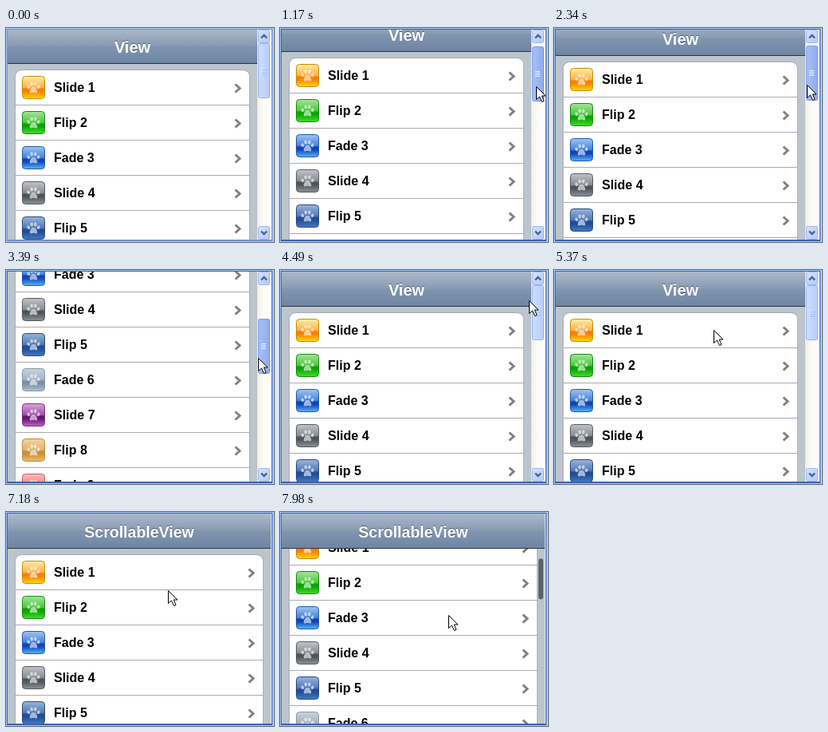
Animation, 336 px wide and 268 px high, one loop 8 s. Source, as an HTML page with a canvas:

```html
<!DOCTYPE html>
<html lang="en">
<head>
<meta charset="utf-8">
<title>Scrollable view</title>
<style>
html, body { margin: 0; width: 100%; height: 100%; overflow: hidden; background: #fff; }
canvas { display: block; }
</style>
</head>
<body>
<canvas id="stage" width="336" height="268"></canvas>
<script>
const ctx = document.getElementById('stage').getContext('2d');
const LOOP = 8000;
const STEP = 60;
const FONT = '"Liberation Sans", Arial, sans-serif';
const VIEW = { x: 2, y: 2, r: 332, b: 265 };
const NARROW = 313, WIDE = 330;
const ROW = 44, LIST_TOP = 54, BAR = 46;
const KINDS = ['Slide', 'Flip', 'Fade'];

// Icon colours: top, upper middle, lower middle, bottom, edge
const TINTS = [
  ['#fff0a4', '#fbb04c', '#ff7e00', '#ffde10', '#c58a08'],
  ['#a8e69c', '#4cc83c', '#0ca404', '#44e42c', '#128a10'],
  ['#a4c8f2', '#4480d8', '#1044b8', '#5cbcfa', '#2058ac'],
  ['#c2c5c9', '#888c92', '#4e545a', '#8f969c', '#565b60'],
  ['#9cb6dc', '#5278b4', '#204c98', '#477cc4', '#284a84'],
  ['#ccd4dd', '#a3b2c3', '#7b90a7', '#b2c2d2', '#8496a8'],
  ['#dda6dd', '#a04fa6', '#6a1376', '#c466cc', '#7c3384'],
  ['#f2d6a6', '#e0b26a', '#cb8f34', '#efc175', '#bf8b40'],
  ['#fcbcbc', '#f48585', '#e84848', '#ff9292', '#d05858']
];

// Each movement advances in equal steps from its start
const STARTS = [0, 660, 1040, 1900, 2910, 3990, 4890, 5900, 7060, 7680];

// Keyframes: [time, value, ...]
const SCROLL = [[1000, 1], [1580, 86], [1700, 86], [2320, 11], [2600, 0],
  [2870, 0], [3390, 158], [3960, 158], [4280, 0]];
const CURSOR = [[660, 333, 62], [780, 321, 69], [1000, 321, 69], [1580, 320, 91],
  [1700, 320, 91], [2320, 317, 71], [2600, 317, 69], [2870, 317, 69],
  [3390, 316, 110], [3960, 316, 110], [4240, 316, 69], [4290, 312, 38],
  [4850, 312, 38], [5370, 200, 75], [7020, 200, 75], [7480, 211, 159],
  [7640, 211, 159], [7980, 211, 129]];
const DRAG = [[7640, 0], [7980, 31]];
const SLIDE = [[5885, 0], [6260, 1]];

const ease = p => (1 - Math.cos(Math.PI * p)) / 2;

function stepped(t) {
  const from = STARTS.filter(s => s <= t).pop();
  return from + Math.floor((t - from) / STEP) * STEP;
}

function at(keys, t, col = 1) {
  if (t <= keys[0][0]) return keys[0][col];
  for (let i = 1; i < keys.length; i++) {
    const a = keys[i - 1], b = keys[i];
    if (t < b[0]) return a[col] + (b[col] - a[col]) * ease((t - a[0]) / (b[0] - a[0]));
  }
  return keys[keys.length - 1][col];
}

function rect(x, y, w, h, fill) {
  ctx.fillStyle = fill;
  ctx.fillRect(x, y, w, h);
}

function rounded(x, y, w, h, r) {
  ctx.beginPath();
  ctx.roundRect(x, y, w, h, r);
}

function outlined(fill, edge) {
  ctx.fillStyle = fill;
  ctx.fill();
  ctx.strokeStyle = edge;
  ctx.lineWidth = 1;
  ctx.stroke();
}

function clipped(x, y, w, h, draw) {
  ctx.save();
  ctx.beginPath();
  ctx.rect(x, y, w, h);
  ctx.clip();
  draw();
  ctx.restore();
}

function ramp(x0, y0, x1, y1, stops) {
  const g = ctx.createLinearGradient(x0, y0, x1, y1);
  stops.forEach(([p, c]) => g.addColorStop(p, c));
  return g;
}

function line(points, color, width) {
  ctx.beginPath();
  points.forEach(([x, y]) => ctx.lineTo(x, y));
  ctx.strokeStyle = color;
  ctx.lineWidth = width;
  ctx.stroke();
}

function dot(x, y, rx, ry, turn = 0) {
  ctx.beginPath();
  ctx.ellipse(x, y, rx, ry, turn, 0, Math.PI * 2);
  ctx.fill();
}

function icon(x, y, [top, upper, lower, bottom, edge]) {
  rounded(x + .5, y + .5, 28, 28, 4);
  outlined(ramp(0, y, 0, y + 29,
    [[0, top], [.5, upper], [.55, lower], [.66, lower], [1, bottom]]), edge);
  ctx.fillStyle = 'rgba(255,255,255,.6)';
  dot(x + 8.3, y + 13.8, 1.8, 2.4, -.4);
  dot(x + 12.2, y + 10, 1.8, 2.6, -.1);
  dot(x + 16.8, y + 10, 1.8, 2.6, .1);
  dot(x + 20.7, y + 13.8, 1.8, 2.4, .4);
  ctx.beginPath();
  ctx.moveTo(x + 14.5, y + 14);
  ctx.bezierCurveTo(x + 18, y + 14, x + 19, y + 18, x + 19.3, y + 19.5);
  ctx.bezierCurveTo(x + 19, y + 23, x + 16, y + 20.8, x + 14.5, y + 20.8);
  ctx.bezierCurveTo(x + 13, y + 20.8, x + 10, y + 23, x + 9.7, y + 19.5);
  ctx.bezierCurveTo(x + 10, y + 18, x + 11, y + 14, x + 14.5, y + 14);
  ctx.fill();
}

function list(x, y, width, selected) {
  const left = x + 9.5, w = width - 19, right = left + w;
  ctx.save();
  rounded(left, y, w, ROW * 22, 8);
  ctx.fillStyle = '#fff';
  ctx.fill();
  ctx.clip();
  TINTS.forEach((tint, i) => {
    const top = y + i * ROW, on = i === selected;
    if (on) rect(left, top, w, ROW, ramp(0, top, 0, top + ROW, [[0, '#058cf5'], [1, '#015de6']]));
    rect(left, top + ROW - 1, w, 1, '#a9abad');
    icon(x + 18, top + 7, tint);
    ctx.font = `bold 16px ${FONT}`;
    ctx.textAlign = 'left';
    ctx.fillStyle = on ? '#fff' : '#000';
    ctx.fillText(`${KINDS[i % 3]} ${i + 1}`, x + 58, top + 27);
    const cx = right - 18, cy = top + 22.5;
    line([[cx, cy - 5], [cx + 5.5, cy], [cx, cy + 5]], on ? '#fff' : '#808080', 3);
  });
  ctx.restore();
  rounded(left, y - .5, w, ROW * 22, 8);
  ctx.strokeStyle = '#a6abb0';
  ctx.lineWidth = 1;
  ctx.stroke();
}

function header(x, y, width, title) {
  rect(x, y, width, BAR, ramp(0, y, 0, y + BAR,
    [[0, '#b0bccd'], [.5, '#889bb3'], [.52, '#8195af'], [1, '#6d84a2']]));
  rect(x, y + BAR - 1, width, 1, '#2d3642');
  ctx.font = `bold ${title.length > 6 ? 19.5 : 20}px ${FONT}`;
  ctx.textAlign = 'center';
  const cx = x + width / 2;
  ctx.fillStyle = 'rgba(0,0,0,.4)';
  ctx.fillText(title, cx, y + 31);
  ctx.fillStyle = '#fff';
  ctx.fillText(title, cx, y + 32);
}

function page(x, width, title, { scroll = 0, drag = 0, selected = -1 } = {}) {
  rect(x, VIEW.y, width, VIEW.b - VIEW.y, '#bcc5ce');
  list(x, LIST_TOP - scroll - drag, width, selected);
  header(x, -scroll, width, title);
}

function barButton(y, dir) {
  rounded(316.5, y + .5, 14, 16, 2);
  outlined(ramp(316, y, 331, y + 16, [[0, '#d8e4ff'], [1, '#b2c8fa']]), '#9db5ea');
  const cy = y + 8.5;
  line([[320, cy + 2 * dir], [323.5, cy - 1.5 * dir], [327, cy + 2 * dir]], '#4d6185', 2.4);
}

function scrollbar(offset, state) {
  rect(315, VIEW.y, 17, VIEW.b - VIEW.y,
    ramp(315, 0, 332, 0, [[0, '#f0efe8'], [.4, '#fbfaf6'], [1, '#fefefb']]));
  barButton(2, 1);
  barButton(248, -1);
  const y = Math.round(19 + offset);
  const [from, to, edge] = [
    ['#d0defd', '#b7ccfb', '#98b2ea'],
    ['#dee9ff', '#c6dbff', '#98b2ea'],
    ['#a9c1f7', '#8eaaf0', '#7c98e0']
  ][state];
  rounded(316.5, y + .5, 14, 68, 2);
  outlined(ramp(316, 0, 331, 0, [[0, from], [1, to]]), edge);
  for (let i = 0; i < 4; i++) {
    rect(320, y + 31 + i * 2, 6, 1, '#eef4fe');
    rect(321, y + 32 + i * 2, 6, 1, '#8cb0f8');
  }
}

function indicator(drag) {
  rounded(324, 51 + drag * .23, 6, 51, 3);
  ctx.fillStyle = 'rgba(0,0,0,.5)';
  ctx.fill();
}

function windowFrame(active) {
  const edge = active ? '#3a62ad' : '#7392cc', rim = '#a9c6f0';
  rect(0, 0, 336, 268, rim);
  rect(1, 1, 333, 266, edge);
  rect(332, 2, 1, 263, '#e6ebf4');
}

function cursor(x, y) {
  ctx.save();
  ctx.translate(Math.round(x) + .5, Math.round(y) + .5);
  ctx.beginPath();
  [[0, 0], [0, 16], [4, 12.5], [7, 19], [9.5, 18], [6.8, 11.5], [11.5, 11.5]]
    .forEach(([px, py]) => ctx.lineTo(px, py));
  ctx.closePath();
  outlined('#fff', '#000');
  ctx.restore();
}

function thumbState(t) {
  if (t < 660 || t >= 4490) return 0;
  return t < 1000 ? 1 : 2;
}

function draw(time) {
  const t = stepped(time);
  const scroll = Math.round(at(SCROLL, t));
  windowFrame(t >= 1040);
  clipped(VIEW.x, VIEW.y, VIEW.r - VIEW.x, VIEW.b - VIEW.y, () => {
    if (t >= 6260) {
      const drag = Math.round(at(DRAG, t));
      page(VIEW.x, WIDE, 'ScrollableView', { drag });
      if (t >= 7480) indicator(drag);
      return;
    }
    const shift = Math.round(NARROW * at(SLIDE, t));
    page(VIEW.x - shift, NARROW, 'View', { scroll, selected: t >= 5900 ? 0 : -1 });
    if (shift) page(VIEW.x + NARROW - shift, NARROW, 'ScrollableView');
    scrollbar(scroll / 3.74, thumbState(time));
  });
  if (t >= 660) cursor(at(CURSOR, t, 1), at(CURSOR, t, 2));
}

const start = performance.now();
function tick() {
  draw((performance.now() - start) % LOOP);
  requestAnimationFrame(tick);
}
tick();
</script>
</body>
</html>
```
